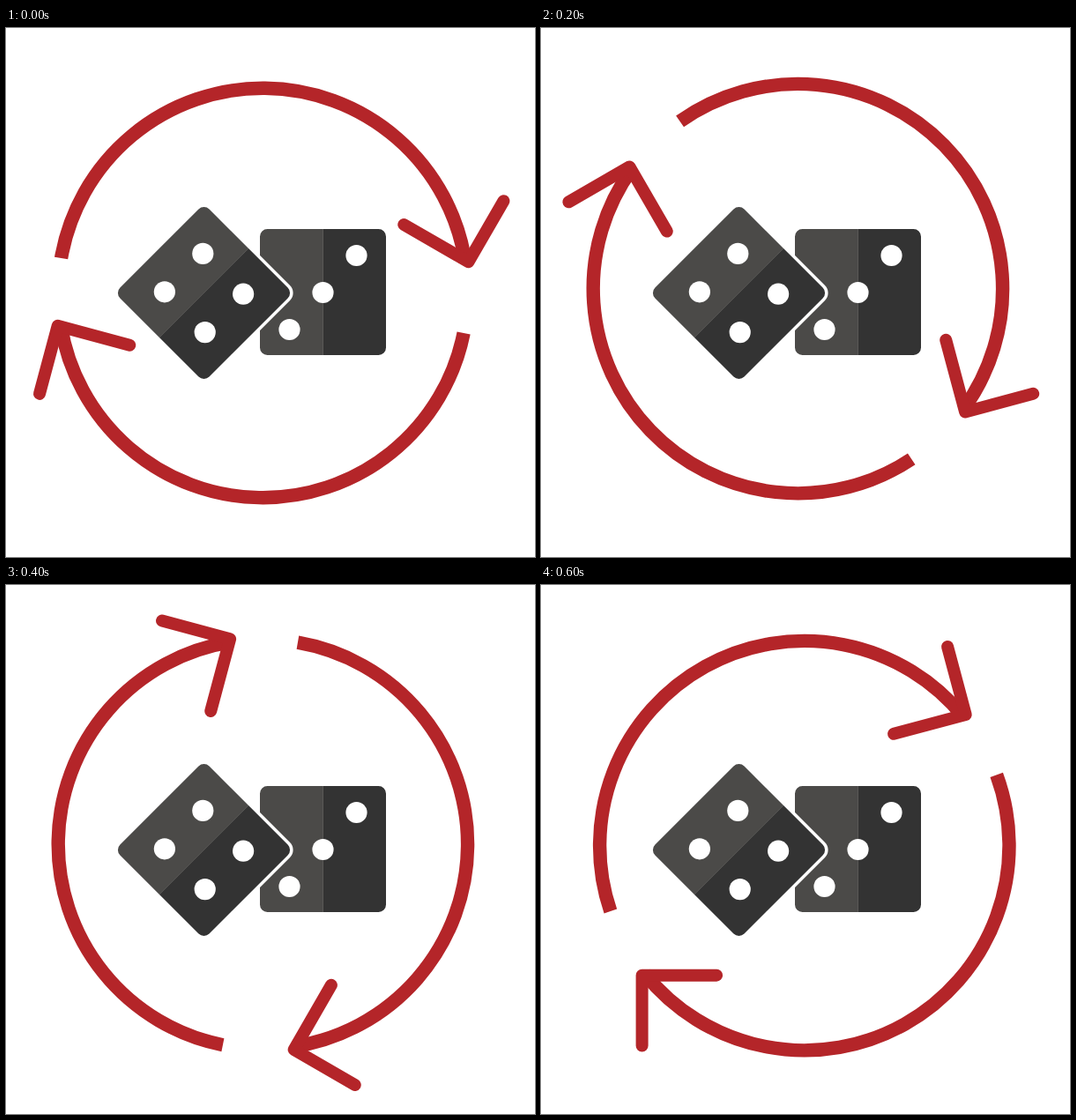
Write an HTML page that moves like this. It is 600 px wide and 600 px high and loops after 700 ms.

```html
<!DOCTYPE html>
<html lang="en">
<head>
<meta charset="utf-8">
<title>Reroll dice</title>
<style>
  html, body { margin: 0; width: 100%; height: 100%; overflow: hidden; background: #fff; }
  svg { display: block; width: 100%; height: 100%; }
</style>
</head>
<body>
<svg viewBox="0 0 600 600">
  <defs>
    <g id="die">
      <path id="half" d="M0 -71.5H63a8.5 8.5 0 0 1 8.5 8.5V63a8.5 8.5 0 0 1 -8.5 8.5H0Z" fill="#333"/>
      <path d="M0.3 -71.5H-63a8.5 8.5 0 0 0 -8.5 8.5V63a8.5 8.5 0 0 0 8.5 8.5H0.3Z" fill="#4b4a48"/>
    </g>
  </defs>
  <g id="arrows" fill="none" stroke="#b42529"></g>
  <g transform="translate(359.5 299.5)">
    <use href="#die"/>
    <g id="three" fill="#fff"></g>
  </g>
  <g transform="translate(224.5 300.5) rotate(45)">
    <rect x="-71.5" y="-71.5" width="143" height="143" rx="8.5" fill="#fff" stroke="#fff" stroke-width="7"/>
    <use href="#die"/>
    <g id="four" fill="#fff"></g>
  </g>
</svg>
<script>
  const STEP = 100;
  const BEATS = 7;
  const RADIUS = 232.2;
  const byId = id => document.getElementById(id);

  const polar = (radius, degrees, [x, y] = [0, 0]) => {
    const a = degrees * Math.PI / 180;
    return [x + radius * Math.cos(a), y + radius * Math.sin(a)];
  };

  const pip = (x, y) => `<circle cx="${x}" cy="${y}" r="12.1"/>`;

  // An arc from tail to tip, with two perpendicular arms at the tip.
  function arrow(tail, tip, innerArm) {
    const corner = polar(235.7, tip);
    const inner = polar(84.5, innerArm, corner);
    const outer = polar(79.8, innerArm + 90, corner);
    return `<path stroke-width="15.4" d="M${polar(RADIUS, tail)}A${RADIUS} ${RADIUS} 0 0 1 ${polar(RADIUS, tip)}"/>
      <path stroke-width="14" stroke-linecap="round" stroke-linejoin="round" d="M${inner}L${corner}L${outer}"/>`;
  }

  const arrows = byId("arrows");
  arrows.innerHTML = arrow(-170.2, -8.6, 210) + arrow(11.3, 170.9, 15);
  byId("three").innerHTML = [-1, 0, 1].map(k => pip(38 * k, 0.5 - 42 * k)).join("");
  byId("four").innerHTML = [-1, 1].flatMap(i => [-1, 1].map(j => pip(32.4 * i, 30.7 * j))).join("");

  // The turn gathers speed in 15-degree notches while the ring sways up, then right.
  function render(ms) {
    const beat = Math.floor(ms / STEP) % BEATS;
    const angle = 15 * Math.floor(1.42 * beat + 0.05 * beat ** 2);
    const x = 291.4 + 3.7 * Math.max(0, beat - 4);
    const y = 294 + 6.5 * (1 - beat / 4) ** 2;
    arrows.setAttribute("transform", `translate(${x} ${y}) rotate(${angle})`);
  }

  const start = performance.now();
  function tick() {
    render(performance.now() - start);
    requestAnimationFrame(tick);
  }
  tick();
</script>
</body>
</html>
```
